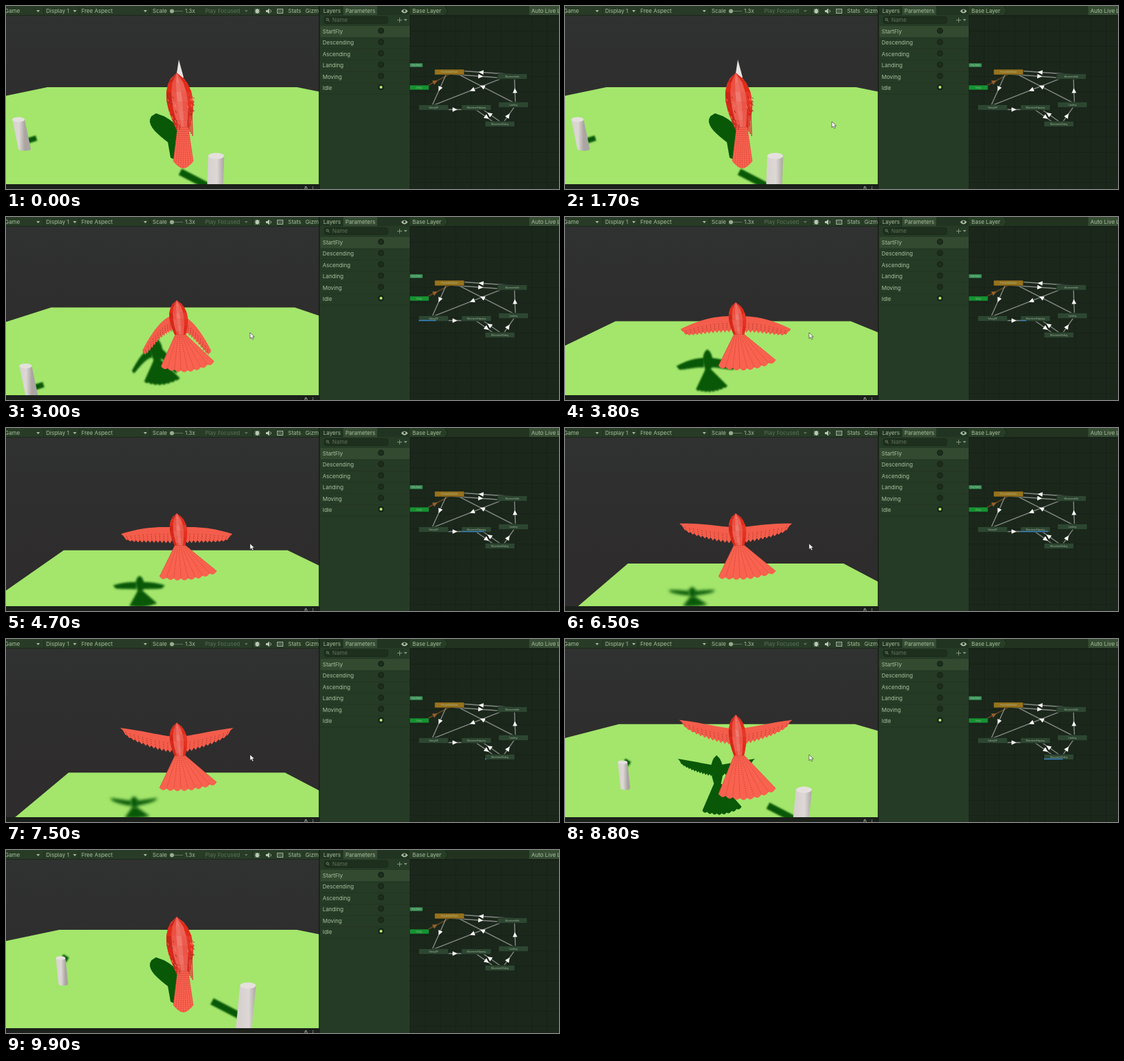
An HTML page with a canvas that plays this animation: 800 px wide and 266 px high, repeating every 10 s.

```html
<!DOCTYPE html>
<html lang="en">
<head>
<meta charset="utf-8">
<title>Bird animator</title>
<style>
html, body { margin: 0; width: 100%; height: 100%; overflow: hidden; background: #1b271b; }
canvas, svg { position: absolute; left: 0; top: 0; display: block; }
canvas { top: 14px; }
text { font: 8px Inter, "Open Sans", sans-serif; fill: #a9c19f; }
.dim { fill: #5d7458; }
.tiny { font-size: 3px; text-anchor: middle; fill: #a9bba2; }
</style>
</head>
<body>
<canvas id="view" width="453" height="245"></canvas>
<svg width="800" height="266" viewBox="0 0 800 266">
  <defs>
    <pattern id="grid" width="22" height="22" x="584" y="14" patternUnits="userSpaceOnUse">
      <path d="M0 .5H22M.5 0V22" stroke="#172118"/>
    </pattern>
  </defs>

  <!-- game view bars -->
  <rect width="453" height="14" fill="#273b26"/>
  <rect y="13" width="453" height="1" fill="#1b281a"/>
  <rect y="259" width="453" height="7" fill="#1b201b"/>
  <g id="gameBar">
    <path d="M54.5 1V13M105.5 1V13M208.5 1V13M356.5 1V13" stroke="#20301f"/>
    <path d="M44 6h5l-2.5 3zM97 6h5l-2.5 3zM199 6h5l-2.5 3z" fill="#a9c19f"/>
    <path d="M345 6h5l-2.5 3z" fill="#5d7458"/>
    <path d="M237 7.5H256" stroke="#60725c"/>
    <circle cx="240" cy="7.5" r="3" fill="#98ab91"/>
    <path d="M360 4.5l7 6m0-6l-7 6M359.5 7.5h8" stroke="#b9c9b2" stroke-width=".9"/>
    <ellipse cx="363.5" cy="7.5" rx="2.4" ry="3.4" fill="#b9c9b2"/>
    <path d="M376 6h2l3-2.5v8l-3-2.5h-2z" fill="#b9c9b2"/>
    <path d="M382.5 5.5q2 2 0 4" fill="none" stroke="#b9c9b2"/>
    <rect x="392.5" y="4.5" width="8" height="6" fill="none" stroke="#a9b9a2"/>
    <path d="M394 6.5h6M394 8.5h6" stroke="#a9b9a2" stroke-dasharray="1 1"/>
    <path d="M432.5 266v-2h3v2M433 264v-1.5h2" fill="none" stroke="#aab3a8" stroke-width=".8"/>
    <path d="M444 262.5v1.2M444 265v1" stroke="#aab3a8" stroke-width="1.3"/>
  </g>

  <!-- parameter panel -->
  <rect x="453" width="131" height="266" fill="#263b26"/>
  <rect x="453" width="131" height="13" fill="#213421"/>
  <rect x="488" width="49" height="13" fill="#344a32"/>
  <rect x="460.5" y="15.5" width="92" height="10" rx="3" fill="#1e2f1e" stroke="#1a2a1a"/>
  <circle cx="465" cy="19.5" r="1.6" fill="none" stroke="#7f9378" stroke-width=".8"/>
  <path d="M466.2 20.8l1.6 1.6M566 20.5h7M569.5 17v7" stroke="#7f9378"/>
  <path d="M575.5 19h5l-2.5 3z" fill="#7f9378"/>
  <path d="M571.5 7.5q5-6 10 0q-5 6-10 0z" fill="#a9bba2"/>
  <circle cx="576.5" cy="7" r="1.7" fill="#263b26"/>
  <rect x="455" y="29" width="129" height="17" fill="#334a31"/>
  <g id="params"></g>
  <rect x="452.5" width="1.5" height="266" fill="#172017"/>

  <!-- state graph -->
  <rect x="584" width="216" height="266" fill="#1b271b"/>
  <rect x="584" y="14" width="216" height="252" fill="url(#grid)"/>
  <rect x="584" width="216" height="13.5" fill="#22341f"/>
  <path d="M584 0H635l4 6.75-4 6.75H584z" fill="#283d26"/>
  <path d="M635 0l4 6.75-4 6.75" fill="none" stroke="#1a281a"/>
  <rect x="757" width="43" height="13.5" fill="#364c33"/>
  <path d="M584 13.5H800" stroke="#172318"/>
  <g id="edges"></g>
  <g id="nodes"></g>
  <rect id="bar" height="1.5" fill="#3a86c4"/>
  <path id="cursor" d="M0 0v8.6l2-1.8 1.5 3.1 1.6-.8-1.5-3h2.8z" fill="#fff" stroke="#222" stroke-width=".6"/>
</svg>
<script>
const $ = id => document.getElementById(id);
const ctx = $('view').getContext('2d');
const LOOP = 10000, STEP = 100;

// ---- interface ----
const label = (x, y, s, cls = '') => `<text x="${x}" y="${y}" class="${cls}">${s}</text>`;

$('gameBar').innerHTML += label(-2, 10, 'Game') + label(58, 10, 'Display 1') +
  label(109, 10, 'Free Aspect') + label(212, 10, 'Scale') + label(259, 10, '1.3x') +
  label(288, 10, 'Play Focused', 'dim') + label(408, 10, 'Stats') + label(433, 10, 'Gizm');

$('params').innerHTML = label(459, 10, 'Layers') + label(491, 10, 'Parameters') +
  label(472, 23, 'Name', 'dim') +
  ['StartFly', 'Descending', 'Ascending', 'Landing', 'Moving', 'Idle'].map((s, i) => {
    const y = 36.5 + i * 16.4;
    return label(458, y + 3.5, s) +
      `<path d="M455 ${y + 9.5}H584" stroke="#203320" stroke-width=".8"/>
       <circle cx="542.5" cy="${y - .5}" r="4" fill="#1c2d1c" stroke="#142014"/>` +
      (s === 'Idle' ? `<circle cx="542.5" cy="${y - .5}" r="2" fill="#b9ef72"/>` : '');
  }).join('');

const state = (x, y, name, fill = '#2d4631', w = 43, h = 8) => ({ x, y, name, fill, w, h });
const states = {
  idle: state(620, 92, 'PerchedIdleState', '#98731c'),
  attack: state(711, 98.5, 'MovementIdle'),
  takeOff: state(597, 143.5, 'TakingOff'),
  flap: state(659, 143.5, 'MovementFlapping'),
  land: state(712.5, 139.5, 'Landing'),
  glide: state(693, 167.5, 'MovementGliding'),
  any: state(584, 83, 'Any State', '#3b9558', 19, 6),
  entry: state(584, 115, 'Entry', '#169331', 28, 7)
};
$('nodes').innerHTML = Object.values(states).map(s =>
  `<rect x="${s.x}" y="${s.y}" width="${s.w}" height="${s.h}" rx="1" fill="${s.fill}" stroke="#152018" stroke-width=".6"/>` +
  label(s.x + s.w / 2, s.y + s.h / 2 + 1, s.name, 'tiny')).join('') +
  label(588, 10, 'Base Layer') + label(760, 10, 'Auto Live L');

// Transitions join node centres, shifted to the right of their direction.
function edge(from, to) {
  const [a, b] = [states[from], states[to]];
  const [x, y] = [a.x + a.w / 2, a.y + a.h / 2];
  const [dx, dy] = [b.x + b.w / 2 - x, b.y + b.h / 2 - y];
  const len = Math.hypot(dx, dy), turn = Math.atan2(dy, dx) * 180 / Math.PI;
  const [line, tip] = from === 'entry' ? ['#6f4a20', '#98602a'] : ['#858a84', '#fff'];
  return `<g transform="translate(${x} ${y}) rotate(${turn}) translate(0 3)">
    <path d="M0 0H${len}" stroke="${line}" stroke-width="1.4"/>
    <path d="M-3.5 -3.3L3.5 0L-3.5 3.3z" transform="translate(${len / 2} 0)" fill="${tip}"/></g>`;
}
$('edges').innerHTML = ['entry idle', 'idle takeOff', 'takeOff flap', 'attack idle', 'idle attack',
  'attack takeOff', 'land idle', 'land attack', 'flap glide', 'glide flap', 'glide land']
  .map(s => edge(...s.split(' '))).join('');

// ---- motion ----
const mix = (a, b, k) => a + (b - a) * k;
const lerp = (p, q, k) => p.map((v, i) => mix(v, q[i], k));
const ramp = (t, from, to) => Math.min(1, Math.max(0, (t - from) / (to - from)));
const smooth = k => k * k * (3 - 2 * k);
const noise = i => { const n = Math.sin(i * 12.9898) * 43758.5453; return n - Math.floor(n); };

function motion(t) {
  const late = t > 6500;
  const alt = late ? 1 - smooth(ramp(t, 7300, 9100)) : ramp(t, 2200, 5300) ** 1.3;
  const spread = ramp(t, 2200, 3100) - ramp(t, 9000, 9500);
  const head = 97 + spread * (late ? 12 + 13 * alt : 27);
  const length = 228 - 10 * spread * (late ? alt : 1) - head;
  const glide = ramp(t, 7000, 7350);
  const beat = mix(Math.sin((t - 3800) / 618 * 2 * Math.PI), .95, glide);
  return { t, late, alt, spread, head, length, beat, beak: 1 - ramp(t, 2200, 2600) - late };
}

// ---- drawing helpers ----
function fill(pts, color) {
  ctx.beginPath();
  pts.forEach(p => ctx.lineTo(...p));
  ctx.closePath();
  ctx.fillStyle = color;
  ctx.fill();
}
function stroke(a, b, color, width = .8) {
  ctx.beginPath();
  ctx.moveTo(...a);
  ctx.lineTo(...b);
  ctx.strokeStyle = color;
  ctx.lineWidth = width;
  ctx.stroke();
}
const range = (n, fn) => Array.from({ length: n + 1 }, (_, i) => fn(i / n, i));

// ---- bird, relative to its crown ----
function wing({ beat, spread }, side) {
  const span = 73 + 2 * beat - 23 * Math.max(0, -beat);
  const at = (u, down) => [
    side * (7 + span * u * (1 - .06 * down)) * spread,
    20 + 19 * u * u - 33 * beat * u ** 1.5 + down * (4 + 18 * Math.sqrt(1 - u * u)) + (1 - spread) * 22
  ];
  const lead = range(12, u => at(u, 0));
  const trail = range(24, (u, i) => at(1 - u, i % 2 ? 1.08 : .9));
  const seams = range(12, u => [at(u, .45), at(u, .9)]);
  return { shape: [...lead, ...trail], seams };
}

function tail({ spread, length, alt }) {
  const top = length * mix(.64, .55, spread) - 5;
  const mid = mix(9, 5, spread);
  const [left, right] = [mix(-5, -25, spread), mix(24, 58, spread)];
  const rim = range(32, k => [
    mix(left, right, k),
    length - 8 * spread * k + Math.sin(k * Math.PI) * (10 - 5 * alt) +
      spread * 3 * Math.abs(Math.sin(k * 8 * Math.PI)) - 2
  ]);
  const seams = range(8, (k, i) => [[mix(mid - 7, mid + 7, k), top], rim[i * 4]]);
  return { shape: [[mid + 8, top], [mid - 8, top], ...rim], seams };
}

function body({ spread, length }) {
  const height = length * mix(.64, .55, spread);
  const half = mix(19, 12.5, spread);
  const at = (u, v) => [
    mix(9, 5, spread) * v + (u * 2 - 1) * half * Math.sin(Math.PI * .85 * v ** .7), height * v
  ];
  return { at, shape: [...range(10, v => at(0, v)), ...range(10, v => at(1, 1 - v))] };
}

function drawBird(m, parts) {
  ctx.save();
  ctx.translate(247, m.head);
  const feathers = ({ shape, seams }, color, dark) => {
    fill(shape, color);
    ctx.setLineDash([1.4, 1.6]);
    seams.forEach(s => stroke(...s, dark));
    ctx.setLineDash([]);
  };
  parts.wings.forEach(w => feathers(w, '#f45d4b', '#8f2a23'));
  if (m.beak > 0) fill([[-1, 7], [3, -19 * m.beak], [10, 7]], '#e9e4e2');
  fill(parts.body.shape, '#dd493b');

  // Faceted plumage: a light middle band with darker flanks.
  const tones = [47, 60, 66, 62, 50], rows = 6, at = parts.body.at;
  tones.forEach((tone, c) => {
    for (let r = 0; r < rows; r++) {
      const [u, v] = [c / 5, r / rows];
      const l = tone + noise(c * 7 + r) * 6 - 3;
      fill([at(u, v), at(u + .21, v), at(u + .21, v + 1 / rows), at(u, v + 1 / rows)], `hsl(5 80% ${l}%)`);
    }
  });
  feathers(parts.tail, '#f9624f', '#c2392f');

  // Ragged folded wings.
  ctx.globalAlpha = Math.max(0, 1 - m.spread * 2);
  for (let i = 0; i < 50; i++) {
    const right = i % 2;
    const [x, y] = at(right ? .78 + noise(i) * .25 : noise(i) * .3, .4 + noise(i + 99) * .55);
    stroke([x, y], [x + 1.5, y + 2 + noise(i + 50) * 3], i % 3 ? '#a3302a' : '#ff7d6b', 1);
  }
  for (let i = 0; i < 3; i++) stroke([18 + i * 2, 62], [19 + i * 2, 86 + i * 3], '#d8473a', 1.5);
  ctx.globalAlpha = 1;
  ctx.restore();
}

const SHADE = '#085808';
function drawShadow({ alt, spread }, parts) {
  ctx.save();
  ctx.filter = `blur(${.7 + 1.3 * alt}px)`;
  ctx.transform(
    mix(.95, .78 - .36 * Math.sqrt(alt), spread), 0,
    mix(.2, -.03, spread), mix(.5, .7 - .4 * alt * alt, spread),
    mix(217, 222 - 38 * alt, spread), 156 + 8 * spread + 67 * alt);
  [...parts.wings, parts.tail, parts.body].forEach(p => fill(p.shape, SHADE));
  ctx.restore();
}

// ---- scenery ----
function drawGround({ t, late, alt }) {
  const sky = ctx.createLinearGradient(0, 14, 0, 200);
  sky.addColorStop(0, '#303131');
  sky.addColorStop(1, '#2e2c2c');
  ctx.fillStyle = sky;
  ctx.fillRect(0, 14, 453, 245);
  const y = 118 + 79 * alt - 2 * late * ramp(t, 8800, 9300);
  const left = late ? 77 + 14 * alt : 60 + 31 * alt;
  const right = 421 - 18 * alt;
  const leftDrop = left * (.21 + .65 * alt), rightDrop = 300 * (.2 + .33 * Math.sqrt(alt));
  fill([[left, y], [right, y], [right + 300, y + rightDrop], [right + 300, 600],
    [-left * 4, 600], [-left * 4, y + leftDrop * 5], [0, y + leftDrop]], '#a3e66b');
}

function pillar(x, y, lean, h, w) {
  const g = ctx.createLinearGradient(x - w / 2, 0, x + w / 2, 0);
  g.addColorStop(0, '#d6d1ce');
  g.addColorStop(.55, '#ddd8d5');
  g.addColorStop(1, '#aaa5a1');
  ctx.beginPath();
  ctx.moveTo(x - w / 2, y);
  ctx.ellipse(x + lean, y + h, w / 2, w / 7, 0, Math.PI, 0, true);
  ctx.lineTo(x + w / 2, y);
  ctx.fillStyle = g;
  ctx.fill();
  ctx.beginPath();
  ctx.ellipse(x, y, w / 2, w / 5, 0, 0, 7);
  ctx.fillStyle = '#e5e0dd';
  ctx.fill();
}

function drawPillars({ late, alt }) {
  const [lx, ly] = late ? [79, 157] : [18, 165];
  const [rx, ry] = late ? [350, 197] : [304, 218];
  ctx.save();
  ctx.translate(60 * alt, 300 * alt);
  ctx.filter = 'blur(1px)';
  if (late) stroke([lx + 2, ly - 2], [lx + 10, ly + 3], SHADE, 8);
  else stroke([lx + 10, ly + 32], [lx + 26, ly + 27], SHADE, 8);
  ctx.filter = 'none';
  pillar(lx, ly, late ? 4 : 9, late ? 38 : 43, late ? 14 : 18);
  ctx.translate(-120 * alt, 0);
  ctx.filter = 'blur(1px)';
  stroke([rx - 52, ry + 23], [rx - 6, ry + 47], SHADE, 10);
  ctx.filter = 'none';
  pillar(rx, ry, late ? -6 : -2, 62, 23);
  ctx.restore();
}

// ---- playback ----
// start, end, state, length of one pass
const active = [[2300, 3500, 'takeOff', 1200], [3500, 7400, 'flap', 1560],
  [7400, 9300, 'glide', 2220], [9300, 9800, 'land', 500]];

function drawUi(t) {
  const run = active.find(([from, to]) => t >= from && t < to);
  $('bar').setAttribute('width', run ? 43 * ((t - run[0]) % run[3]) / run[3] : 0);
  if (run) {
    const { x, y } = states[run[2]];
    $('bar').setAttribute('x', x);
    $('bar').setAttribute('y', y + 6.2);
  }
  const enter = ramp(t, 500, 1200), leave = ramp(t, 9200, 9700);
  const x = 480 - 94 * enter - 33 * ramp(t, 2000, 2700) + 450 * leave;
  $('cursor').setAttribute('transform', `translate(${x} ${270 - 102 * enter + 100 * leave})`);
}

function frame() {
  const m = motion(Math.floor(performance.now() % LOOP / STEP) * STEP);
  const parts = {
    wings: m.spread > .05 ? [wing(m, 1), wing(m, -1)] : [],
    tail: tail(m),
    body: body(m)
  };
  ctx.setTransform(1, 0, 0, 1, 0, -14);
  drawGround(m);
  drawShadow(m, parts);
  drawPillars(m);
  drawBird(m, parts);
  drawUi(m.t);
  requestAnimationFrame(frame);
}
frame();
</script>
</body>
</html>
```
